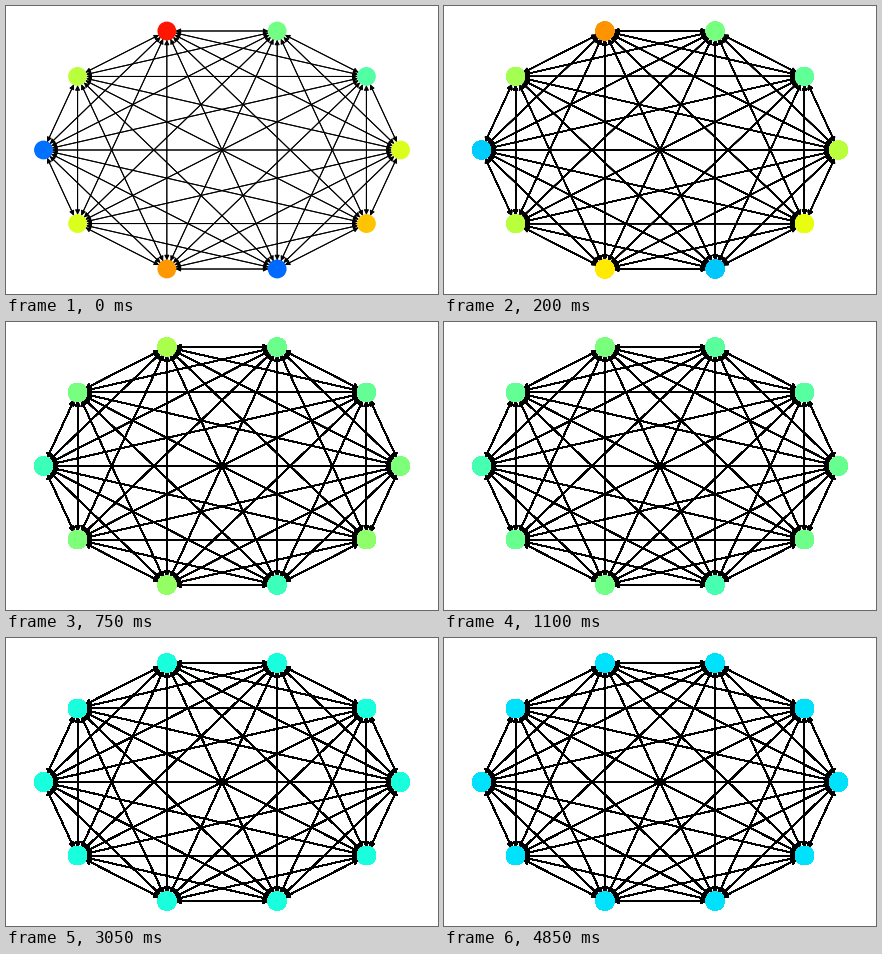
A matplotlib script that plays this animation: 432x288 px, repeating every 5 s.

```python
from itertools import permutations

import numpy as np
import matplotlib.pyplot as plt
from matplotlib.animation import FuncAnimation
from matplotlib.collections import PathCollection
from matplotlib.patches import ArrowStyle, ConnectionStyle
from matplotlib.transforms import IdentityTransform

W, H, DPI = 432, 288, 72
FRAMES, INTERVAL = 100, 50
N = 10
NODE_SIZE = 300
MARGIN = 1.1 ** 2

# Consensus dynamics: the spread shrinks while the mean settles slowly.
OFFSETS = np.array([0.062, -0.105, -0.065, 0.328, 0.021,
                    -0.318, 0.062, 0.193, -0.327, 0.145])


def values(k):
    mean = 0.31 + 0.245 * 0.98 ** k
    return mean + OFFSETS * 0.9 ** k


def circle_layout():
    angle = 2 * np.pi * np.arange(N) / N
    x, y = np.cos(angle), np.sin(angle)
    return np.column_stack([W / 2 * (1 + x / MARGIN),
                            H / 2 * (1 + y / (MARGIN * y.max()))])


def arrow_paths(points):
    connect, style = ConnectionStyle("arc3"), ArrowStyle("-|>")
    gap = np.sqrt(NODE_SIZE) / 2
    paths, faces = [], []
    for a, b in permutations(points, 2):
        line = connect(tuple(a), tuple(b), shrinkA=gap, shrinkB=gap)
        parts, filled = style(line, 10, 1, 1)
        for part, fill in zip(parts, filled):
            paths.append(part)
            faces.append("black" if fill else "none")
    return paths, faces


layers = 1


def overdraw(img, dpi):
    """Opacity after painting the same layer several times."""
    out = img.copy()
    out[..., 3] = 1 - (1 - img[..., 3]) ** layers
    return out, 0, 0


fig = plt.figure(figsize=(W / DPI, H / DPI), dpi=DPI, facecolor="white")
ax = fig.add_axes([0, 0, 1, 1])
ax.set(xlim=(0, W), ylim=(0, H))
ax.axis("off")

points = circle_layout()
paths, faces = arrow_paths(points)
edges = PathCollection(paths, facecolors=faces, edgecolors="black",
                       linewidths=1, capstyle="round", joinstyle="round",
                       transform=IdentityTransform(), zorder=1)
ax.add_collection(edges, autolim=False)
nodes = ax.scatter(*points.T, s=NODE_SIZE, c=values(0), cmap="jet",
                   vmin=0, vmax=1, linewidths=1.5, zorder=2)
for artist in (edges, nodes):
    artist.set_agg_filter(overdraw)


def update(k):
    global layers
    layers = k + 1
    nodes.set_array(values(k))
    return edges, nodes


anim = FuncAnimation(fig, update, frames=FRAMES, interval=INTERVAL,
                     repeat=True, repeat_delay=0, blit=False)
plt.show()
```
